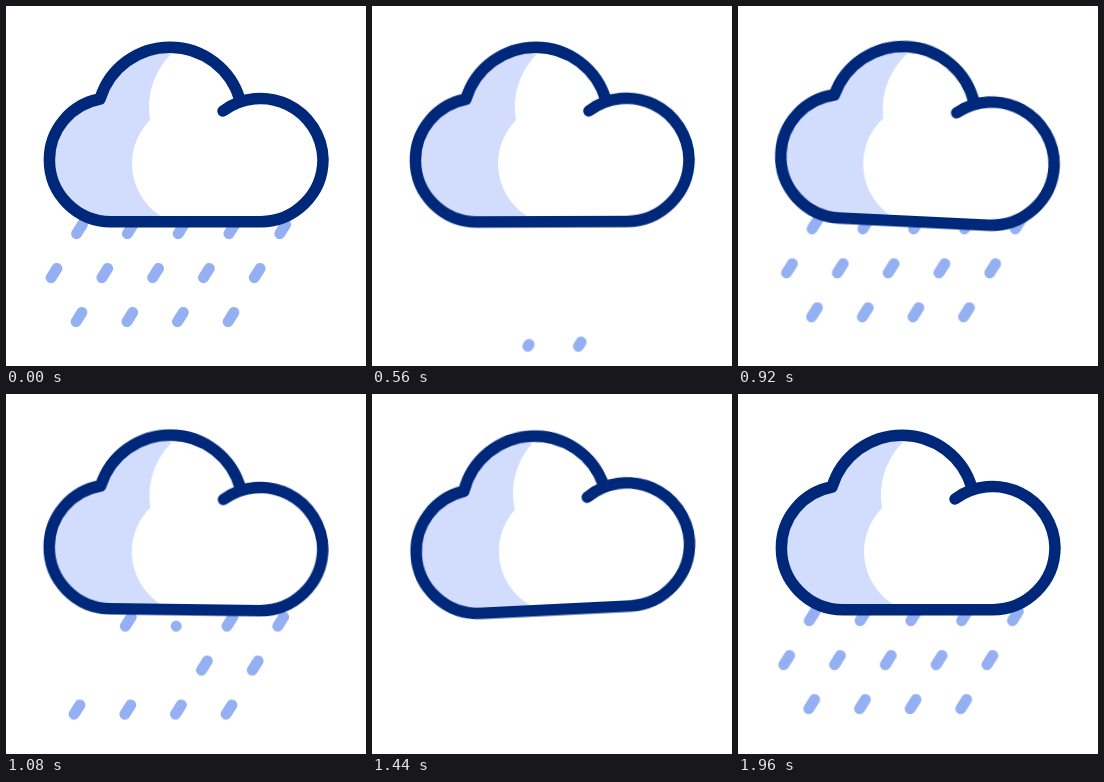
Write an HTML page without scripts that moves like this. It is 360 by 360 pixels and loops after 2 s.

```html
<!DOCTYPE html>
<html lang="en">
<head>
<meta charset="utf-8">
<title>Rain cloud</title>
<style>
  html, body { margin: 0; width: 100%; height: 100%; overflow: hidden; background: #fff; }
  svg { display: block; width: 100vw; height: 100vh; }

  .cloud { transform-origin: 180px 140px; animation: sway 2s cubic-bezier(.37, 0, .63, 1) infinite; }
  .line { fill: none; stroke: #00287a; stroke-width: 11.5; stroke-linecap: round; stroke-linejoin: round; }

  .rain { animation: fall 2s linear infinite; }
  .rain use {
    fill: none; stroke: #94b0f2; stroke-width: 11; stroke-linecap: round;
    stroke-dasharray: 10 100;
    animation: 2s linear var(--d, 0s) infinite;
  }
  .rain .top { animation-name: top; }
  .rain .left { animation-name: left; }
  .rain .right { animation-name: right; }
  .rain .low { animation-name: low; }

  @keyframes sway {
    0%, 82.5%, 100% { transform: rotate(0deg); }
    14.5% { transform: rotate(-3.05deg); }
    42.5% { transform: rotate(3deg); }
    70% { transform: rotate(-3deg); }
  }

  /* two showers per loop, each jumping back to its start */
  @keyframes fall {
    0%, 100% { transform: translate(0, 0); }
    16% { transform: translate(-7.5px, 10px); }
    30% { transform: translate(-17px, 27px); }
    30.01% { transform: translate(14.5px, -23px); }
    38% { transform: translate(9px, -14px); }
    54% { transform: translate(-2px, 4.5px); }
    62% { transform: translate(-7.5px, 14px); }
    75% { transform: translate(-16px, 28.5px); }
    75.01% { transform: translate(15px, -27px); }
    82% { transform: translate(10.7px, -19px); }
    98% { transform: translate(.7px, -.9px); }
  }

  /* 10.5: not yet drawn, 0: whole drop, -10.5: wiped away */
  @keyframes top {
    0%, 12.5%, 36%, 50.5%, 83%, 100% { stroke-dashoffset: 0; }
    16.25%, 54.25% { stroke-dashoffset: -10.5; animation-timing-function: step-end; }
    34%, 80% { stroke-dashoffset: 10.5; }
  }
  @keyframes left {
    0%, 11.5%, 33%, 51%, 80%, 100% { stroke-dashoffset: 0; }
    14.5%, 53.5% { stroke-dashoffset: -10.5; animation-timing-function: step-end; }
    31%, 77% { stroke-dashoffset: 10.5; }
  }
  @keyframes right {
    0%, 20.5%, 37%, 64.5%, 86.5%, 100% { stroke-dashoffset: 0; }
    24.5%, 68.5% { stroke-dashoffset: -10.5; animation-timing-function: step-end; }
    33.5%, 83.5% { stroke-dashoffset: 10.5; }
  }
  @keyframes low {
    0%, 26%, 44.25%, 68%, 93.5%, 100% { stroke-dashoffset: 0; }
    30%, 72% { stroke-dashoffset: -10.5; animation-timing-function: step-end; }
    40.75%, 90% { stroke-dashoffset: 10.5; }
  }
</style>
</head>
<body>
<svg viewBox="0 0 360 360">
  <defs>
    <path id="drop" pathLength="10" d="M2.9-4.6l-5.8 9.2"/>
    <path id="shape" d="M217 105A62.5 62.5 0 0 1 317 153.5A62.5 62.5 0 0 1 254 215.7H105A61.7 61.7 0 0 1 43.4 154A61.7 61.7 0 0 1 94 93A73 73 0 0 1 234 94"/>
  </defs>

  <g class="rain">
    <use class="top" href="#drop" x="73.5" y="223" style="--d:-.07s"/>
    <use class="top" href="#drop" x="124.3" y="223" style="--d:-1.92s"/>
    <use class="top" href="#drop" x="175.1" y="223"/>
    <use class="top" href="#drop" x="225.9" y="223" style="--d:-1.91s"/>
    <use class="top" href="#drop" x="276.7" y="223" style="--d:-1.9s"/>

    <use class="left" href="#drop" x="48" y="267" style="--d:-.02s"/>
    <use class="left" href="#drop" x="98.8" y="267" style="--d:-.01s"/>
    <use class="left" href="#drop" x="149.6" y="267"/>
    <use class="right" href="#drop" x="200.4" y="267" style="--d:-.02s"/>
    <use class="right" href="#drop" x="251.2" y="267"/>

    <use class="low" href="#drop" x="73" y="311" style="--d:-.06s"/>
    <use class="low" href="#drop" x="123.8" y="311" style="--d:-.04s"/>
    <use class="low" href="#drop" x="174.4" y="311" style="--d:-.02s"/>
    <use class="low" href="#drop" x="225" y="311"/>
  </g>

  <g class="cloud">
    <use href="#shape" fill="#fff"/>
    <path fill="#d2ddfd" d="M172 42A75 75 0 0 0 144 114A62 62 0 0 0 160 213V215.7H105A61.7 61.7 0 0 1 43.4 154A61.7 61.7 0 0 1 94 93A73 73 0 0 1 172 42z"/>
    <use class="line" href="#shape"/>
  </g>
</svg>
</body>
</html>
```
